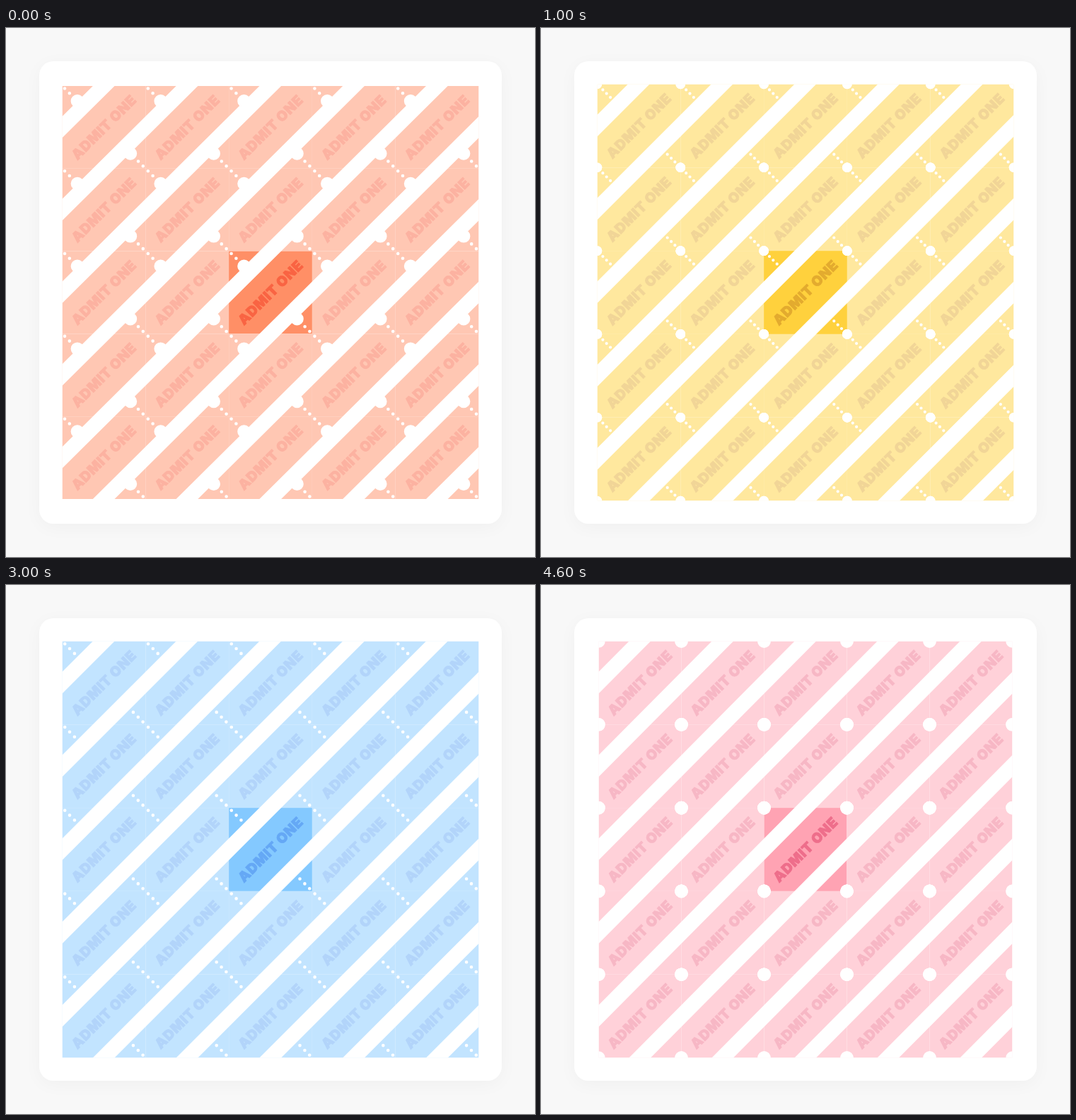
An HTML page with a canvas for the animation above (5000 ms loop, 748 by 748 pixels).

```html
<!DOCTYPE html>
<html lang="en">
<head>
<meta charset="utf-8">
<title>Ticket pattern</title>
<style>
  html, body { margin: 0; width: 100%; height: 100%; overflow: hidden; background: #f8f8f8; }
  canvas { display: block; }
</style>
</head>
<body>
<canvas id="stage" width="748" height="748"></canvas>
<script>
const ctx = document.getElementById('stage').getContext('2d');
const SIZE = 748, N = 5, TILE = 117.8, HOLD = 1000;

// fill and ink colours, tile step, holes as [position on the tile diagonal, radius]
const NOTCH = [[21.4, 9.3]];
const CORNER = r => [[0, r]];
const dots = (r, ...at) => at.map(p => [p, r]);

const THEMES = [
  { fill: [255, 143, 102], ink: [249, 100, 67], h: 116.8,
    holes: [...NOTCH, ...dots(2.3, 3.5, 10.3)] },
  { fill: [255, 209, 61], ink: [227, 171, 47],
    holes: [...CORNER(6.8), ...dots(2.1, 7.9, 13.2, 18.6)] },
  { fill: [171, 220, 121], ink: [136, 183, 91], holes: NOTCH },
  { fill: [132, 201, 255], ink: [101, 168, 245],
    holes: dots(2.3, 3.7, 10.5, 17.4) },
  { fill: [255, 163, 179], ink: [238, 110, 139], w: 117,
    holes: CORNER(9.3) }
];

const tint = (rgb, strong) =>
  `rgb(${rgb.map(v => strong ? v : Math.round((v + 255) / 2))})`;

function eachTile(fn) {
  for (let row = 0; row < N; row++)
    for (let col = 0; col < N; col++)
      fn(col * TILE, row * TILE, row === 2 && col === 2);
}

function drawCard() {
  ctx.fillStyle = '#f8f8f8';
  ctx.fillRect(0, 0, SIZE, SIZE);
  ctx.save();
  ctx.shadowColor = 'rgba(0,0,0,.035)';
  ctx.shadowBlur = 26;
  ctx.shadowOffsetY = 5;
  ctx.fillStyle = '#fff';
  ctx.beginPath();
  ctx.roundRect(47, 47, 654, 654, 20);
  ctx.fill();
  ctx.restore();
}

function drawLabel(x, y, color) {
  ctx.save();
  ctx.translate(x + TILE / 2, y + TILE / 2);
  ctx.rotate(-Math.PI / 4);
  ctx.fillStyle = ctx.strokeStyle = color;
  ctx.fillText('ADMIT ONE', 0, 7);
  ctx.strokeText('ADMIT ONE', 0, 7);
  ctx.restore();
}

function drawGaps() {
  const end = N * TILE;
  ctx.strokeStyle = '#fff';
  ctx.lineWidth = 21.7;
  ctx.beginPath();
  for (let k = 0; k < 2 * N; k++) {
    const sum = 58.65 + k * TILE;
    ctx.moveTo(sum + 20, -20);
    ctx.lineTo(sum - end - 20, end + 20);
  }
  ctx.stroke();
}

function drawHoles(x, y, holes) {
  ctx.beginPath();
  for (const [p, r] of holes)
    for (const q of [p, TILE - p]) {
      ctx.moveTo(x + q + r, y + q);
      ctx.arc(x + q, y + q, r, 0, 2 * Math.PI);
    }
  // corner holes also sit on the other diagonal
  if (holes[0][0] === 0) {
    const r = holes[0][1];
    for (const [cx, cy] of [[x + TILE, y], [x, y + TILE]]) {
      ctx.moveTo(cx + r, cy);
      ctx.arc(cx, cy, r, 0, 2 * Math.PI);
    }
  }
  ctx.fill();
}

function drawPattern({ fill, ink, holes, w = TILE, h = TILE }) {
  ctx.save();
  ctx.translate((SIZE - N * w) / 2, (SIZE - N * h) / 2);
  ctx.scale(w / TILE, h / TILE);
  ctx.beginPath();
  ctx.rect(0, 0, N * TILE, N * TILE);
  ctx.clip();

  ctx.font = '900 19.6px Inter, "Open Sans", sans-serif';
  ctx.textAlign = 'center';
  ctx.lineWidth = 0.9;
  ctx.lineJoin = 'miter';
  ctx.miterLimit = 3;
  ctx.letterSpacing = '0.7px';
  eachTile((x, y, strong) => {
    ctx.fillStyle = tint(fill, strong);
    ctx.fillRect(x, y, TILE, TILE);
    drawLabel(x, y, tint(ink, strong));
  });

  drawGaps();
  ctx.fillStyle = '#fff';
  eachTile((x, y) => drawHoles(x, y, holes));
  ctx.restore();
}

function frame() {
  const step = Math.floor(performance.now() / HOLD) % THEMES.length;
  drawCard();
  drawPattern(THEMES[step]);
  requestAnimationFrame(frame);
}
frame();
</script>
</body>
</html>
```
